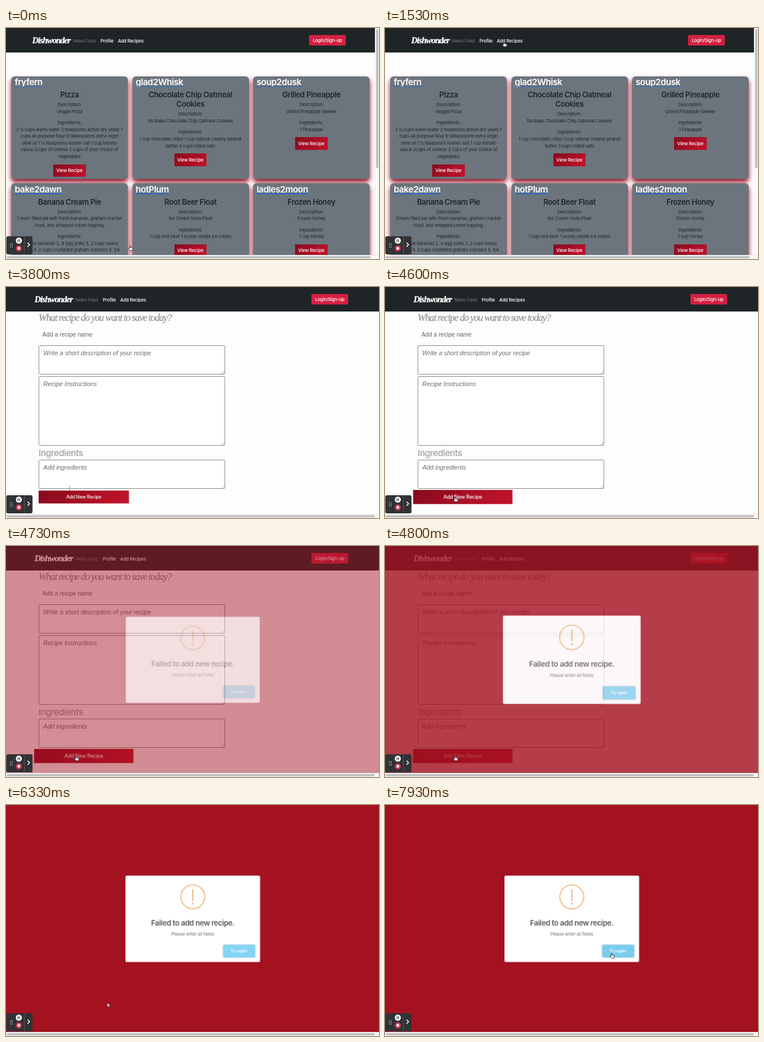
Animation, 640 px wide and 396 px high, one loop 8000 ms. Source, as an HTML page:

```html
<!DOCTYPE html>
<html lang="en">
<head>
<meta charset="utf-8">
<title>Recipe site walkthrough</title>
<style>
html, body { margin: 0; width: 100%; height: 100%; overflow: hidden; background: #fff; }
#stage { position: absolute; left: 0; top: 0; width: 640px; height: 396px; overflow: hidden; background: #fdfdfd;
  font: 7.75px Inter, "Open Sans", sans-serif; letter-spacing: -.026em; color: #212529; }
#stage div, svg { position: absolute; box-sizing: border-box; }
.view { left: 0; top: 0; width: 640px; height: 389px; overflow: hidden; }
.t { line-height: 0; white-space: pre; }
.c { transform: translateX(-50%); }
.nav { left: 0; top: 0; height: 42px; background: #1f2527; color: #fff; font-weight: 500; }
.dim { color: #74787a; font-weight: 400; }
.script { font: italic 17px "Liberation Serif", serif; line-height: 0; letter-spacing: -.068em;
  color: #999; -webkit-text-stroke: .3px; }
.brand { font-size: 15px; font-weight: 700; color: #fff; letter-spacing: -.064em; }
.login { background: #d32042; border-radius: 2px; }
.card { width: 200px; height: 176px; border-radius: 6px; background: #6c757d; box-shadow: 0 5px 8px #96061c; }
.name { font-size: 15px; font-weight: 600; letter-spacing: -.03em; color: #fff; }
.name::after { content: ""; position: absolute; left: 0; right: 0; top: 6.8px; height: 1.6px; background: #2b6cc8; }
.title { font-size: 13px; font-weight: 600; letter-spacing: -.03em; }
.btn { background: linear-gradient(135deg, #870a1d, #c5142c); color: #fff; font-size: 8px; font-weight: 500; }
.area { left: 56px; width: 320px; border: 1px solid #8c8c8c; border-radius: 1.5px; background: #fff; }
.hint { font: 10.25px "Liberation Sans", Arial, sans-serif; line-height: 0; letter-spacing: 0; color: #666; }
.hint.it { font-size: 10.8px; font-style: italic; color: #6c6c6c; }
.sub { font-size: 15.1px; font-weight: 500; letter-spacing: -.03em; color: #a2a2a2; }
.overlay { background: #a41220; }
.modal { left: 204.5px; top: 121px; width: 231px; height: 147.5px; border-radius: 2.5px; background: #fff; }
.fail { font-size: 12.7px; font-weight: 600; letter-spacing: -.03em; color: #595959; }
.note { color: #757575; }
.again { border-radius: 2.5px; background: #84d4f4; box-shadow: 0 0 0 1.3px rgba(43, 114, 165, .29);
  color: #fff; font-size: 6.8px; font-weight: 600; }
.thumb { background: #c1c1c1; border-radius: 2px; }
</style>
</head>
<body>
<div id="stage"></div>
<script>
const LOOP = 8000, SWITCH = 2000, ALERT = 4646;
const stage = document.getElementById('stage');

function box(parent, cls, [x, y, w, h] = []) {
  const el = document.createElement('div');
  el.className = cls;
  const rect = { left: x, top: y, width: w, height: h };
  for (const side in rect) if (rect[side] !== undefined) el.style[side] = rect[side] + 'px';
  parent.append(el);
  return el;
}

// y is the middle of the capitals
function text(parent, x, y, string, cls = '') {
  const el = box(parent, 't ' + cls, [x, y]);
  el.textContent = string;
  return el;
}

function draw(parent, [x, y, w, h], shapes) {
  parent.insertAdjacentHTML('beforeend',
    `<svg style="left:${x}px;top:${y}px" width="${w}" height="${h}" overflow="visible">${shapes}</svg>`);
  return parent.lastElementChild;
}

// steps: [ms, properties, easing to the next step]
function loop(el, steps) {
  const frames = steps.map(([ms, props, easing = 'linear']) => ({ ...props, offset: ms / LOOP, easing }));
  frames.push({ ...steps[steps.length - 1][1], offset: 1 });
  el.animate(frames, { duration: LOOP, iterations: Infinity });
}

const show = (el, ...spans) => loop(el, [[0, { opacity: spans[0][0] ? 0 : 1 }, 'step-end'],
  ...spans.flatMap(([from, to]) => [[from, { opacity: 1 }, 'step-end'], [to, { opacity: 0 }, 'step-end']])
    .filter(([ms]) => ms > 0 && ms < LOOP)]);

function button(parent, rect, label, cls) {
  const el = box(parent, cls, rect);
  text(el, rect[2] / 2, rect[3] / 2, label, 'c');
  return el;
}

function navbar(parent, width, shift) {
  const nav = box(parent, 'nav', [0, 0, width]);
  text(nav, 45 + shift, 20.5, 'Dishwonder', 'script brand');
  text(nav, 115 + shift, 21.5, 'News Feed', 'dim');
  text(nav, 162 + shift, 21.5, 'Profile');
  text(nav, 192 + shift, 21.5, 'Add Recipes');
  button(nav, [520 + shift, 12, 63, 18], 'Login/Sign-up', 'login');
}

function card(parent, x, y, [name, titles, about, items]) {
  const el = box(parent, 'card', [x, y]);
  const line = (at, string, cls = '') => text(el, 100, at, string, 'c ' + cls);
  text(el, 6, 10.5, name, 'name');
  let at = 31.5;
  titles.forEach((s, i) => line(at += i && 16.3, s, 'title'));
  line(at += 17, 'Description:');
  about.forEach(s => line(at += 11.6, s));
  line(at += 19.4, 'Ingredients:');
  items.forEach(s => line(at += 11.6, s));
  button(el, [72, at + 13.5, 55.5, 21.5], 'View Recipe', 'btn');
}

function scrollbar(width) {
  const bar = box(stage, '', [0, 389, 640, 7]);
  bar.style.cssText += 'background:#fafafa;border-top:1px solid #e4e4e4';
  box(bar, 'thumb', [1, 1.2, width, 3.8]);
  return bar;
}

const recipes = [
  ['fryfern', ['Pizza'], ['Veggie Pizza'], ['2 ½ cups warm water 2 teaspoons active dry yeast 7',
    'cups all-purpose flour 6 tablespoons extra virgin', 'olive oil 1 ½ teaspoons kosher salt 1 cup tomato',
    'sauce 2cups of cheese 2 cups of your choice of', 'vegetables']],
  ['glad2Whisk', ['Chocolate Chip Oatmeal', 'Cookies'], ['No Bake Chocolate Chip Oatmeal Cookies'],
    ['1 cup chocolate chips 1 cup natural creamy peanut', 'butter 3 cups rolled oats']],
  ['soup2dusk', ['Grilled Pineapple'], ['Grilled Pineapple Skewer'], ['1 Pineapple']],
  ['bake2dawn', ['Banana Cream Pie'],
    ['Cream filled pie with fresh bananas, graham cracker', 'crust, and whipped cream topping.'],
    ['1. 3 ripe bananas 2. 4 egg yolks 3. 2 cups heavy', 'cream 4. 2 cups crumbled graham crackers 5. 1/4']],
  ['hotPlum', ['Root Beer Float'], ['Ice Cream Soda Float'], ['1 cup root beer 1 scoop vanilla ice cream']],
  ['ladles2moon', ['Frozen Honey'], ['Frozen Honey'], ['1 cup Honey']]
];

// Feed page
const feed = box(stage, 'view');
recipes.forEach((recipe, i) =>
  card(feed, 9 + i % 3 * 207.5, 82.5 + Math.floor(i / 3) * 183.5, recipe));
navbar(feed, 633, 0);
const track = box(feed, '', [633, 0, 7, 389]);
track.style.cssText += 'background:#fafafa;border-left:1px solid #f0f0f0';
box(track, 'thumb', [1, 2, 4, 238]);

// Form page
const form = box(stage, 'view');
text(form, 56, 53, 'What recipe do you want to save today?', 'script');
text(form, 62.5, 82, 'Add a recipe name', 'hint');
[[100, 50, 'Write a short description of your recipe'], [152.5, 119, 'Recipe Instructions'], [296, 50, 'Add ingredients']]
  .forEach(([y, h, hint]) => {
    const area = box(form, 'area', [56, y, 320, h]);
    text(area, 7, 12, hint, 'hint it');
    draw(area, [313, h - 7, 5, 5], '<path d="M0 5 5 0M3 5 5 3" stroke="#888" stroke-width=".7"/>');
  });
text(form, 56, 284.5, 'Ingredients', 'sub');
const add = button(form, [56, 348.5, 155, 22], 'Add New Recipe', 'btn');
navbar(form, 640, 4);

// Alert
const overlay = box(stage, 'view overlay');
const modal = box(overlay, 'modal');
draw(modal, [0, 0, 231, 80], `<g fill="#edbf8a"><circle cx="115.5" cy="36.5" r="20.5" fill="none" stroke="#edbf8a" stroke-width="2"/>
  <rect x="114.3" y="23" width="2.4" height="20.5" rx="1.2"/><circle cx="115.5" cy="48" r="1.7"/></g>`);
text(modal, 115.5, 81.7, 'Failed to add new recipe.', 'fail c');
text(modal, 115.5, 100, 'Please enter all fields', 'note c');
const again = button(modal, [167.5, 119, 54, 20.5], 'Try again', 'again');

const feedBar = scrollbar(625), formBar = scrollbar(632);

// Recorder controls
const dots = [0, 1, 2].flatMap(r => [0, 1].map(c =>
  `<circle cx="${7.6 + c * 2.9}" cy="${12.7 + r * 2.9}" r=".75" fill="#ddd"/>`)).join('');
draw(stage, [0, 356.5, 46, 31], `<rect x=".5" width="45" height="31" rx="3" fill="#303235"/>${dots}
  <circle cx="22" cy="7.5" r="5.2" fill="#fff"/><path d="M20.6 5.2v4.6M23.4 5.2v4.6" stroke="#333" stroke-width="1.3"/>
  <circle cx="22" cy="20.7" r="5.2" fill="#d3344e"/><rect x="19.9" y="18.6" width="4.2" height="4.2" rx=".5" fill="#fff"/>
  <path d="M31.5 1v29" stroke="#888" stroke-width=".7" stroke-dasharray="1 .6"/>
  <path d="M37 11l3.4 3.5-3.4 3.5" fill="none" stroke="#fff" stroke-width="1.5"/>`);

// Pointer: origin at the hot spot
const pointer = box(stage, '', [0, 0, 0, 0]);
const outline = 'fill="#fff" stroke="#111" stroke-width=".8" stroke-linejoin="round"';
const hand = draw(pointer, [0, 0, 1, 1], `<path ${outline} d="M-1 .7Q0-.5 .8 .7V3.2L3.8 4Q4.8 4.4 4.6 6L4 8.6H-.4L-3 5.6Q-3.3 4.3-1 5Z"/>`);
const arrow = draw(pointer, [0, 0, 1, 1], `<path ${outline} d="M0 0V8L1.9 6.3 3.2 9 4.5 8.4 3.3 5.8H5.7Z"/>`);
const beam = draw(pointer, [0, 0, 1, 1], '<path d="M-1.3-3.6Q0-3.6 0-2.6V2.6Q0 3.6-1.3 3.6M1.3-3.6Q0-3.6 0-2.6M0 2.6Q0 3.6 1.3 3.6" fill="none" stroke="#777" stroke-width=".8"/>');

const at = (x, y) => ({ transform: `translate(${x}px, ${y}px)` });
loop(pointer, [
  [0, at(213, 373)], [250, at(213, 373), 'ease-in-out'], [1400, at(204.5, 23.5)],
  [2700, at(204.5, 23.5), 'ease-in-out'], [3700, at(109, 345.5)],
  [3850, at(109, 345.5), 'ease-in-out'], [4150, at(120.5, 359.5)],
  [5900, at(120.5, 359.5), 'ease-in-out'], [7300, at(389, 254)]
]);
show(hand, [0, 300], [1350, 2750], [4000, 6000], [7220, LOOP]);
show(arrow, [300, 1350], [2750, 3150], [6000, 7220]);
show(beam, [3150, 4000]);

show(feed, [0, SWITCH]);
show(feedBar, [0, SWITCH]);
show(form, [SWITCH, LOOP]);
show(formBar, [SWITCH, LOOP]);

const scale = s => ({ transform: `scale(${s})` });
loop(add, [[0, scale(1)], [4050, scale(1), 'ease'], [4250, scale(1.1)]]);
loop(overlay, [[0, { opacity: 0 }], [ALERT, { opacity: 0 }, 'ease'], [ALERT + 300, { opacity: 1 }]]);
loop(modal, [[0, { opacity: 0 }], [ALERT, { opacity: 0 }, 'ease'], [ALERT + 200, { opacity: 1 }]]);
loop(modal, [[0, scale(1)], [ALERT, scale(1), 'ease'], [ALERT + 3, scale(.5), 'ease'],
  [ALERT + 135, scale(1.05), 'ease'], [ALERT + 240, scale(.95), 'ease'], [ALERT + 300, scale(1)]]);
loop(again, [[0, { backgroundColor: '#84d4f4' }, 'step-end'], [7220, { backgroundColor: '#7acdee' }]]);
</script>
</body>
</html>
```
